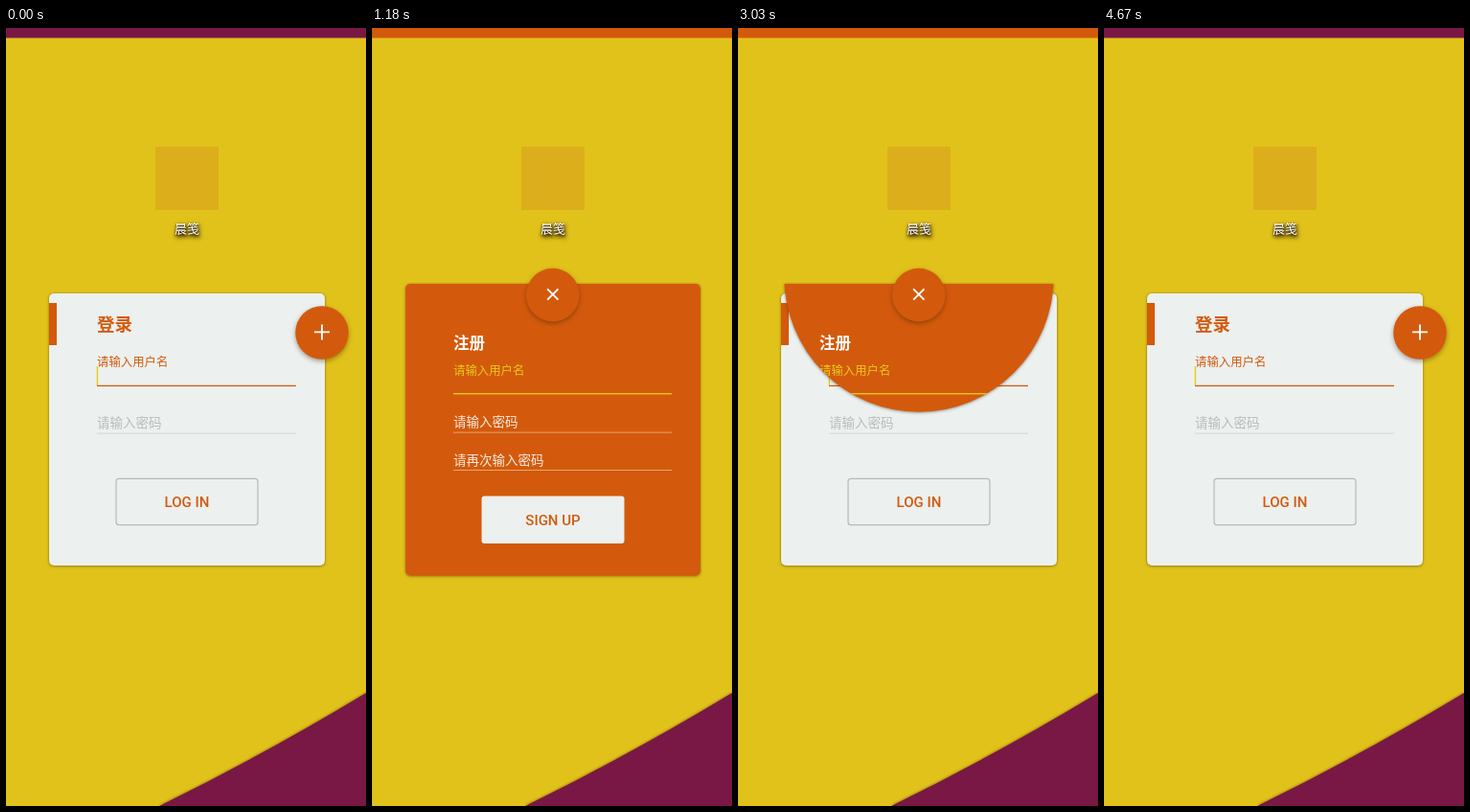
Animation, 376 px wide and 812 px high, one loop 4.7 s. Source, as an HTML page:

```html
<!DOCTYPE html>
<html lang="zh">
<head>
<meta charset="utf-8">
<title>登录 / 注册</title>
<style>
  html, body { margin: 0; width: 100%; height: 100%; overflow: hidden; background: #e1c21a; }
  svg { display: block; width: 376px; height: 812px; }
  text { font-family: "Noto Sans CJK SC", "Noto Sans CJK", "Noto Sans", sans-serif; }
  .btn { font: 500 15px Roboto, sans-serif; text-anchor: middle; fill: #d35a0c; }
  .bold { font-weight: 700; }
  .label { font-size: 12.4px; }
  .hint { font-size: 13.5px; }
  .accent { fill: #d35a0c; }
  .paper { fill: #ecf0ef; }
  .gold { fill: #e8c91c; }
  .card { filter: drop-shadow(0 0 .8px rgba(60, 40, 0, .25)) drop-shadow(0 1.5px 1.5px rgba(60, 40, 0, .35)); }
  #corner { filter: drop-shadow(0 -1px 1px rgba(70, 30, 0, .35)); }
  #fab { filter: drop-shadow(0 2px 2.5px rgba(60, 30, 0, .42)); }
  .tag {
    font-size: 13px; text-anchor: middle; fill: #fff;
    filter: drop-shadow(0 1px 1px #2a1c00) drop-shadow(1px 2px 2px #2a1c00);
  }
</style>
</head>
<body>
<svg viewBox="0 0 376 812">
  <defs>
    <clipPath id="reveal"><circle id="hole" cx="189" cy="260" r="28"/></clipPath>
  </defs>

  <rect width="376" height="812" fill="#e1c21a"/>
  <path id="corner" d="M160 812Q270 758 376 694V812Z" fill="#7a1845"/>
  <rect id="bar" width="376" height="10.4"/>

  <rect x="156" y="124" width="66" height="66" fill="#dcae1c"/>
  <text class="tag" x="189" y="214">晨笺</text>

  <g class="card">
    <rect class="paper" x="45" y="277" width="288" height="284" rx="5"/>
    <rect class="accent" x="45" y="287" width="8" height="44"/>
    <text class="accent bold" x="95" y="316.3" font-size="18.5">登录</text>
    <text class="accent label" x="95" y="353">请输入用户名</text>
    <rect id="loginCaret" class="gold" x="94.7" y="353" width="1.4" height="20"/>
    <rect class="accent" x="95" y="372.8" width="208" height="1.3"/>
    <text class="hint" x="95" y="417" fill="#b9bcbc">请输入密码</text>
    <rect x="95" y="422.6" width="208" height="1" fill="#d3d6d5"/>
    <rect x="115" y="470.3" width="148" height="48.4" rx="3" fill="none" stroke="#b5b9b8" stroke-width="1.2"/>
    <text class="btn" x="189" y="500.4">LOG IN</text>
  </g>

  <g id="signup" class="card">
    <g id="sheet">
      <rect class="accent" x="35" y="267" width="308" height="304.5" rx="5"/>
      <text class="bold" x="85" y="335" font-size="16.5" fill="#fff">注册</text>
      <text class="gold label" x="85" y="362">请输入用户名</text>
      <rect id="signupCaret" class="gold" x="84.7" y="361.5" width="1.4" height="20"/>
      <rect class="gold" x="85" y="381" width="228" height="1.4"/>
      <text class="hint" x="85" y="416" fill="#f6ece2">请输入密码</text>
      <rect x="85" y="421.6" width="228" height="1" fill="#e6a672"/>
      <text class="hint" x="85" y="455.6" fill="#f6ece2">请再次输入密码</text>
      <rect x="85" y="461" width="228" height="1" fill="#e6a672"/>
      <rect class="paper" x="114.5" y="488.5" width="149" height="49.5" rx="3"/>
      <text class="btn" x="189" y="519.2">SIGN UP</text>
    </g>
  </g>

  <g id="fab">
    <circle class="accent" r="27.8"/>
    <circle id="ripple" r="27" fill="#402000"/>
    <path id="icon" d="M-8 0H8M0-8V8" stroke="#fff" stroke-width="1.9"/>
  </g>
</svg>
<script>
const LOOP = 4700;
const OPEN = 350, SHOW = 655, HIDE = 2640, BACK = 3232;
const MOVE = 300, REVEAL = 500;
const R0 = 28, R1 = 318;
const PURPLE = [122, 24, 69], ORANGE = [211, 90, 12];
// centred seat, two control points, right-hand seat
const ARC = [[188.8, 278.6], [214.5, 324], [285, 343.5], [330, 318]];

const $ = id => document.getElementById(id);
const span = (t, from, length) => Math.min(1, Math.max(0, (t - from) / length));
const mix = (a, b, p) => a + (b - a) * p;
const within = (t, a, b) => t >= a && t < b;
const show = (id, on) => $(id).setAttribute('visibility', on ? 'visible' : 'hidden');

const cubic = (a, b, c, d, u) => {
  const v = 1 - u;
  return v * v * v * a + 3 * v * v * u * b + 3 * v * u * u * c + u * u * u * d;
};

// cubic-bezier(.4, 0, .2, 1)
function ease(x) {
  let lo = 0, hi = 1;
  for (let i = 0; i < 20; i++) {
    const m = (lo + hi) / 2;
    if (cubic(0, .4, .2, 1, m) < x) lo = m; else hi = m;
  }
  return cubic(0, 0, 1, 1, lo);
}

function press(t, down, up) {
  return .13 * span(t, down, 100) * (1 - span(t, up, 200));
}

function draw(t) {
  const out = t < 2000 ? 1 - ease(span(t, OPEN, MOVE)) : ease(span(t, BACK, MOVE));
  const [x, y] = [0, 1].map(k => cubic(...ARC.map(p => p[k]), out));
  const cross = within(t, OPEN, HIDE + REVEAL);
  $('fab').setAttribute('transform', `translate(${x} ${y})`);
  $('icon').setAttribute('transform', `translate(0 -.6) rotate(${cross ? 45 : 0})`);
  $('ripple').setAttribute('opacity', t < OPEN ? press(t, 200, 320) : press(t, 2580, 2810));
  $('bar').setAttribute('fill', `rgb(${ORANGE.map((c, i) => mix(c, PURPLE[i], out))})`);

  const p = t < 2000 ? span(t, SHOW, REVEAL) : span(t, HIDE, REVEAL);
  const moving = p > 0 && p < 1;
  $('hole').setAttribute('r', t < 2000 ? mix(R0, R1, p * p) : mix(R1, R0, p * p));
  if (moving) $('sheet').setAttribute('clip-path', 'url(#reveal)');
  else $('sheet').removeAttribute('clip-path');
  show('signup', within(t, SHOW, HIDE + REVEAL));

  $('signupCaret').setAttribute('opacity', (t + 320) % 1000 < 500 ? 1 : 0);
  show('loginCaret', !within(t, 170, 670) && !within(t, 3870, 4370));
}

const start = performance.now();
function tick() {
  draw((performance.now() - start) % LOOP);
  requestAnimationFrame(tick);
}
tick();
</script>
</body>
</html>
```
